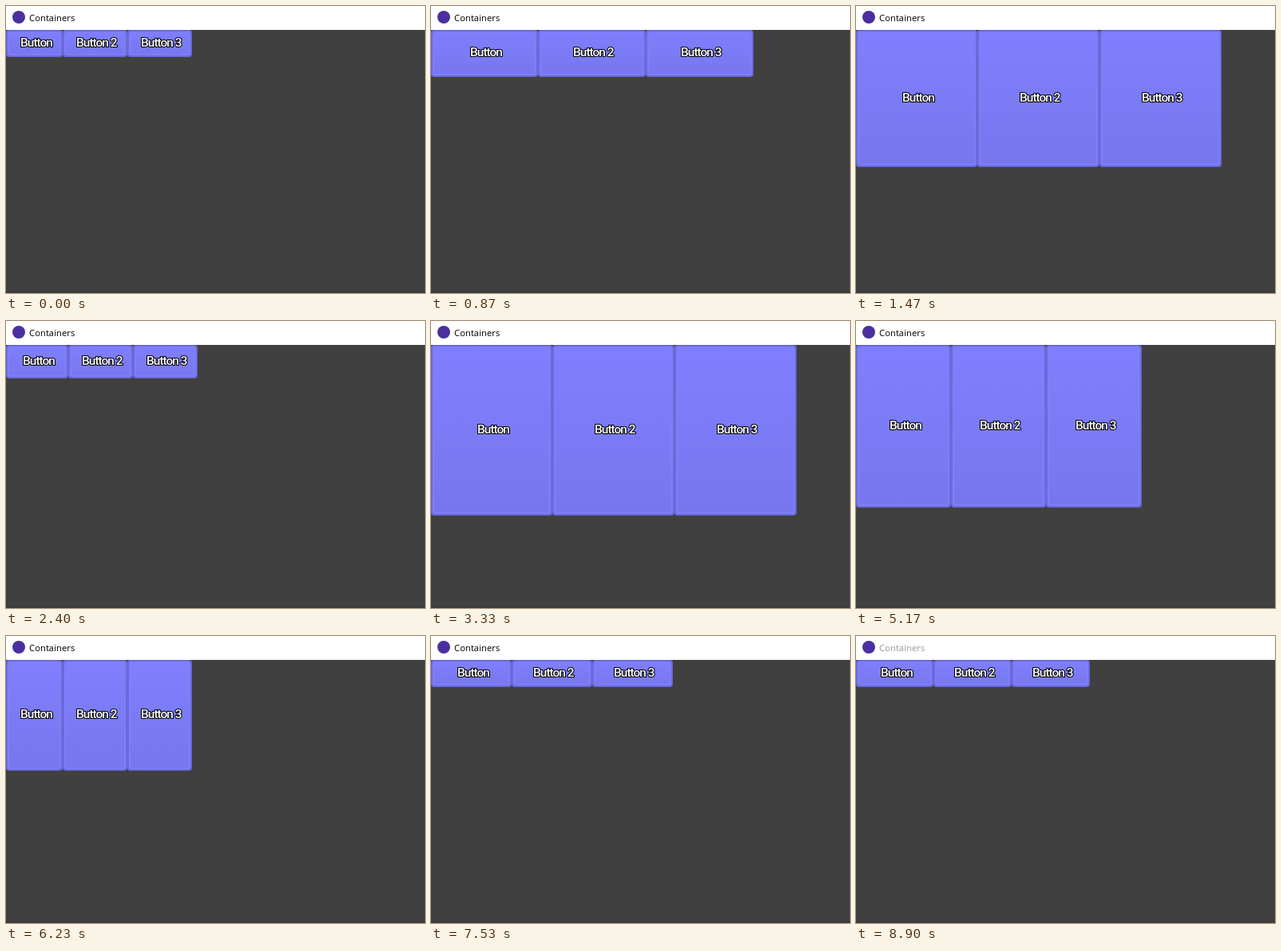
Animation, 525 px wide and 360 px high, one loop 8.96 s. Source, as an HTML page with a canvas:

```html
<!DOCTYPE html>
<html lang="en">
<head>
<meta charset="utf-8">
<title>Containers</title>
<style>
  html, body { margin: 0; width: 100%; height: 100%; overflow: hidden; background: #404040; }
  canvas { display: block; }
</style>
</head>
<body>
<canvas id="stage" width="525" height="360"></canvas>
<script>
const ctx = document.getElementById('stage').getContext('2d');
const LOOP = 8960, BAR = 30, MIN_RIGHT = 233, MIN_BOTTOM = 64, LABEL_MIN = 81;

// Turning points of the dragged corner; the container stops at its minimum size
const path = [
  { t: 330, right: 233, bottom: 64 },
  { t: 1200, right: 485, bottom: 122 },
  { t: 1470, right: 458, bottom: 202 },
  { t: 2600, right: 225, bottom: 60 },
  { t: 3330, right: 458, bottom: 244 },
  { t: 3900, right: 485, bottom: 362 },
  { t: 4370, right: 465, bottom: 287 },
  { t: 5800, right: 233, bottom: 217 },
  { t: 6100, right: 150, bottom: 217 },
  { t: 6440, right: 150, bottom: 70 },
  { t: 7250, right: 398, bottom: 107 },
  { t: 7530, right: 303, bottom: 64 },
  { t: 7900, right: 335, bottom: 102 },
  { t: 8130, right: 293, bottom: 64 }
];

const slope = (i, side) => (path[i + 1][side] - path[i][side]) / (path[i + 1].t - path[i].t);

// Tangent that never overshoots a turning point
function tangent(i, side) {
  if (i === 0 || i === path.length - 1) return 0;
  const a = slope(i - 1, side), b = slope(i, side);
  return a * b <= 0 ? 0 : 2 * a * b / (a + b);
}

function edgeAt(time, side) {
  const next = path.findIndex(p => p.t > time);
  if (next === 0) return path[0][side];
  if (next < 0) return path[path.length - 1][side];
  const i = next - 1, from = path[i], to = path[next];
  const span = to.t - from.t, u = (time - from.t) / span, v = 1 - u;
  return from[side] * v * v * (1 + 2 * u) + to[side] * u * u * (1 + 2 * v)
    + span * u * v * (tangent(i, side) * v - tangent(next, side) * u);
}

function box(x, y, w, h, radius, fill) {
  ctx.beginPath();
  ctx.roundRect(x, y, w, h, radius);
  ctx.fillStyle = fill;
  ctx.fill();
}

function button(left, right, bottom, label) {
  const w = right - left, h = bottom - BAR;
  const shade = ctx.createLinearGradient(0, BAR, 0, bottom);
  shade.addColorStop(0, '#8080ff');
  shade.addColorStop(1, '#7676ed');
  box(left, BAR, w, h, 4, '#6a6ada');
  box(left + 2, BAR + 2, w - 4, h - 4, 3, '#7f7ffb');
  box(left + 4, BAR + 3, w - 8, h - 7, 2, shade);

  ctx.font = '500 15.5px Roboto, sans-serif';
  ctx.letterSpacing = '-1px';
  const x = Math.round((left + right - ctx.measureText(label).width) / 2 + 2);
  const y = Math.floor((BAR + bottom) / 2) + 4;
  ctx.lineWidth = 2.2;
  ctx.lineJoin = 'round';
  ctx.strokeStyle = '#000';
  ctx.strokeText(label, x, y);
  ctx.fillStyle = '#fff';
  ctx.fillText(label, x, y);
}

function titleBar(focused) {
  ctx.fillStyle = '#fff';
  ctx.fillRect(0, 0, 525, BAR);
  box(8, 6, 16, 16, 8, '#4b2f9e');
  ctx.font = '11.3px "Open Sans", sans-serif';
  ctx.letterSpacing = '0px';
  ctx.fillStyle = focused ? '#000' : '#999';
  ctx.fillText('Containers', 29, 19);
}

function draw(time) {
  // 30 steps per second, on times rounded to 10 ms
  const step = Math.round(Math.floor((time + 4) * 0.03) / 0.3) * 10;
  const right = Math.max(MIN_RIGHT, Math.round(edgeAt(step, 'right')));
  const bottom = Math.max(MIN_BOTTOM, Math.round(edgeAt(step, 'bottom')));

  ctx.fillStyle = '#404040';
  ctx.fillRect(0, 0, 525, 360);
  ctx.fillStyle = '#3b3b3b';
  ctx.fillRect(0, 357, 525, 3);

  // Equal thirds, unless the longer labels need their minimum width
  const first = Math.min(right / 3, right - 2 * LABEL_MIN);
  const edges = [0, first, (first + right) / 2, right].map(Math.floor);
  ['Button', 'Button 2', 'Button 3'].forEach((label, i) =>
    button(edges[i], edges[i + 1], bottom, label));
  titleBar(time < 8900);
}

const start = performance.now();
function tick() {
  draw((performance.now() - start) % LOOP);
  requestAnimationFrame(tick);
}
tick();
</script>
</body>
</html>
```
